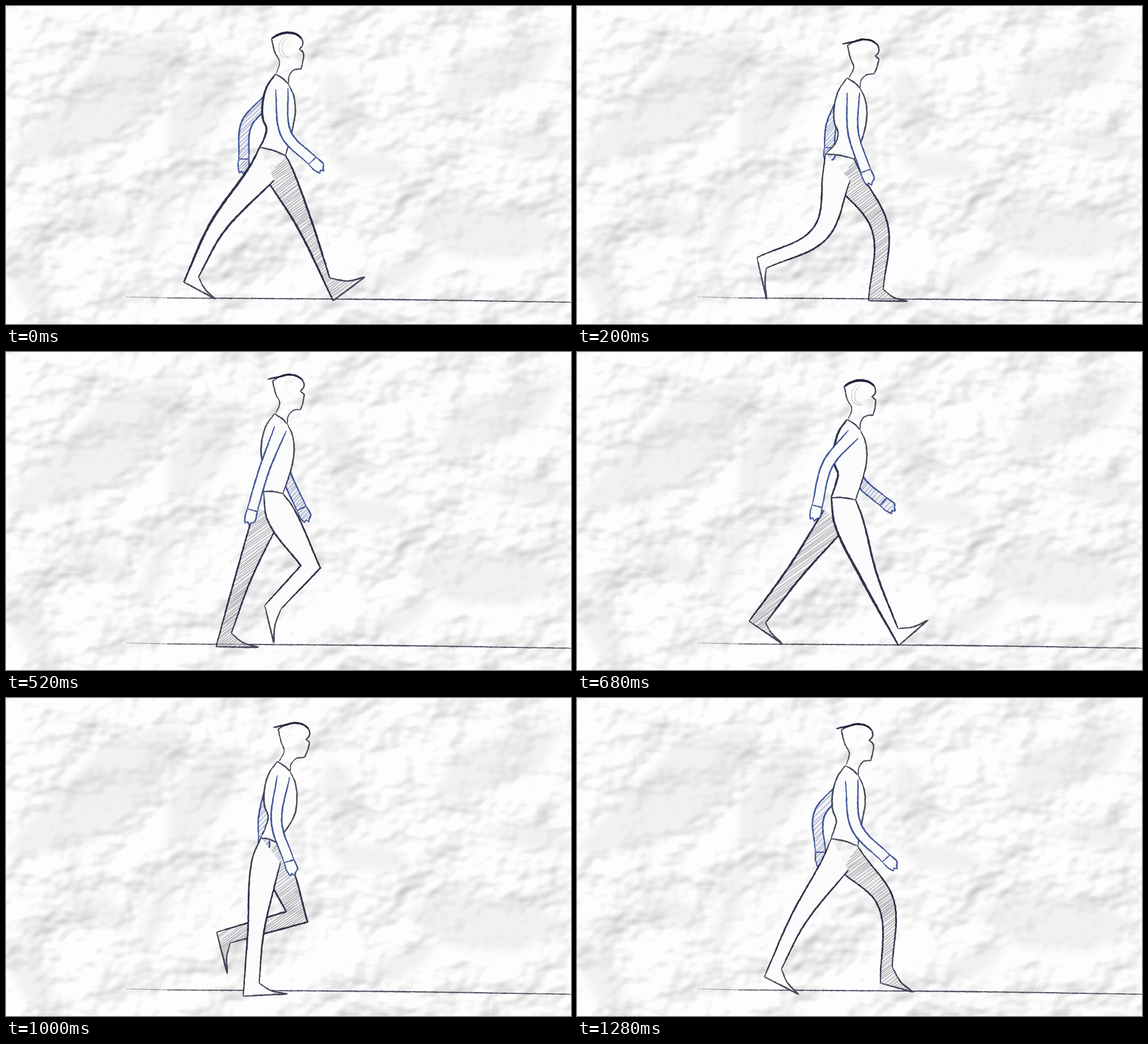
An HTML page for the animation above (1320 ms loop, 998x561 px).

```html
<!DOCTYPE html>
<html lang="en">
<head>
<meta charset="utf-8">
<title>Walk cycle</title>
<style>
html, body { margin: 0; width: 100%; height: 100%; overflow: hidden; background: #fafafa; }
svg { position: absolute; left: 0; top: 0; width: 100%; height: 100%; }
</style>
</head>
<body>
<svg id="paper" viewBox="0 0 998 561">
  <defs>
    <filter id="grain" x="0" y="0" width="100%" height="100%" color-interpolation-filters="sRGB">
      <feTurbulence type="fractalNoise" baseFrequency=".007 .009" numOctaves="4" seed="8"/>
      <feDiffuseLighting surfaceScale="13" diffuseConstant="1.135" lighting-color="#fff">
        <feDistantLight azimuth="225" elevation="60"/>
      </feDiffuseLighting>
    </filter>
    <filter id="soft" x="-20%" y="-20%" width="140%" height="140%"><feGaussianBlur stdDeviation="7"/></filter>
  </defs>
  <rect width="998" height="561" fill="#fafafa"/>
  <rect width="998" height="561" filter="url(#grain)" opacity=".6"/>
  <g id="folds" filter="url(#soft)" fill="#dcdcde" opacity=".36"></g>
  <g id="ground"></g>
</svg>
<svg id="figure" viewBox="0 0 998 561"></svg>

<script>
const PAPER = '#fbfbfb', INK = '#1c2138', PENCIL = '#35374c', BLUE = '#34478f';
const COUNT = 16, LOOP = 1320;
const hold = i => i === 0 || i === 12 ? 120 : i === 15 ? 40 : 80;
const starts = [0];
for (let i = 0; i < COUNT - 1; i++) starts.push(starts[i] + hold(i));

// Key poses by drawing. Body: neck, waist back, waist front, head lean.
const body = {
  0: [489, 128, 448, 249, 494, 264, 0, 0],
  2: [490, 135, 439, 261, 490, 270, 8, 5],
  6: [487, 117, 455, 246, 489, 250, 4, 4],
  8: [490, 127, 449, 257, 492, 261, 2, 4],
  10: [494, 130, 449, 264, 489, 265, 11, 5],
  12: [492, 120, 450, 247, 478, 255, 9, 5],
  15: [487, 127, 449, 248, 496, 261, 0, 0]
};
// Leg: knee, heel, instep, toe.
const nearLeg = {
  0: [372, 392, 314, 487, 340, 478, 370, 517],
  2: [430, 400, 318, 444, 334, 463, 335, 518],
  6: [538, 379, 457, 447, 486, 453, 473, 513],
  8: [517, 398, 568, 518, 567, 488, 620, 473],
  10: [533, 383, 511, 520, 538, 493, 584, 517],
  12: [441, 415, 419, 526, 447, 503, 497, 522],
  15: [390, 392, 331, 492, 361, 478, 392, 523]
};
const farLeg = {
  0: [526, 382, 578, 520, 572, 480, 634, 478],
  2: [535, 391, 515, 520, 541, 500, 584, 521],
  6: [419, 398, 371, 520, 398, 496, 446, 521],
  8: [385, 388, 304, 475, 333, 478, 363, 515],
  10: [436, 392, 306, 423, 342, 428, 316, 512],
  12: [514, 386, 372, 413, 396, 432, 391, 487],
  15: [545, 360, 536, 503, 557, 475, 594, 519]
};
// Arm: elbow, wrist.
const nearArm = {
  0: [495, 226, 541, 273], 2: [488, 224, 510, 291], 6: [457, 205, 435, 279], 8: [443, 198, 424, 272],
  10: [452, 207, 438, 275], 12: [478, 220, 500, 288], 15: [494, 228, 546, 283]
};
const farArm = {
  0: [425, 208, 420, 270], 2: [449, 212, 446, 250], 6: [498, 225, 522, 276], 8: [500, 228, 541, 264],
  10: [496, 232, 524, 288], 12: [455, 212, 455, 245], 15: [428, 205, 430, 272]
};
// The legs trade places half a cycle later.
for (const [to, from] of [[4, 12], [7, 15], [14, 6]]) {
  nearLeg[to] = farLeg[from];
  farLeg[to] = nearLeg[from];
}

const pairs = n => n.reduce((out, v, i) => (i % 2 ? out[out.length - 1].push(v) : out.push([v]), out), []);

// Outlines relative to the neck, and the hand relative to the wrist.
const HEAD = pairs([-11, -10, -6, -30, -14, -46, -20, -70, -9, -77, 8, -81, 24, -78, 33, -71,
  35, -59, 29, -52, 36, -46, 35, -29, 32, -17, 19, -15, 11, -4, 10, 9]);
const BACK = pairs([-13, -8, -28, 14, -36, 46, -35, 72, -29, 88, -33, 106]);
const CHEST = pairs([10, 10, 19, 30, 22, 58, 17, 88]);
const HAND = pairs([0, -9, 14, -9, 25, -6, 22, -2, 27, 2, 22, 5, 18, 10, 8, 10, 0, 9]);

let seed = 1;
const rnd = () => (seed = seed * 16807 % 2147483647) / 2147483647;
const add = (a, b, k = 1) => [a[0] + b[0] * k, a[1] + b[1] * k];
const sub = (a, b) => add(a, b, -1);
const lerp = (a, b, k) => a.map((v, i) => v + (b[i] - v) * k);
const unit = v => { const l = Math.hypot(...v) || 1; return [v[0] / l, v[1] / l]; };
const dot = (a, b) => a[0] * b[0] + a[1] * b[1];
const normal = d => [-d[1], d[0]];
const toPath = pts => 'M' + pts.map(p => p[0].toFixed(1) + ' ' + p[1].toFixed(1)).join('L');

function pose(track, at) {
  let lo = at, hi = at;
  while (!track[lo]) lo--;
  while (!track[hi % COUNT]) hi++;
  return pairs(lerp(track[lo], track[hi % COUNT], hi > lo ? (at - lo) / (hi - lo) : 0));
}

// Hermite curve through the points; sharp turns stay corners.
function curve(pts) {
  const last = pts.length - 1, out = [];
  const tangent = i => {
    if (i === 0 || i === last) return null;
    const a = unit(sub(pts[i], pts[i - 1])), b = unit(sub(pts[i + 1], pts[i]));
    return dot(a, b) < 0.6 ? null : unit(add(a, b));
  };
  for (let i = 0; i < last; i++) {
    const a = pts[i], b = pts[i + 1], side = sub(b, a), len = Math.hypot(...side);
    const m = tangent(i) || unit(side), n = tangent(i + 1) || unit(side);
    const steps = Math.max(2, Math.round(len / 3));
    for (let s = 0; s < steps; s++) {
      const t = s / steps;
      const p = add(add(a, side, t * t * (3 - 2 * t)), m, t * (1 - t) * (1 - t) * len);
      out.push(add(p, n, t * t * (t - 1) * len));
    }
  }
  return [...out, pts[last]];
}

// Brush stroke with tapered ends and slightly rough edges.
function stroke(pts, w, color, opacity = 0.9) {
  const line = curve(pts), left = [], right = [], end = line.length - 1;
  line.forEach((p, i) => {
    const n = normal(unit(sub(line[Math.min(end, i + 1)], line[Math.max(0, i - 1)])));
    const half = w * (0.48 + 0.42 * Math.sqrt(Math.abs(Math.sin(Math.PI * i / end)))) / 2;
    left.push(add(p, n, half + (rnd() - 0.5) * 0.7));
    right.unshift(add(p, n, -half + (rnd() - 0.5) * 0.7));
  });
  return `<path d="${toPath(left.concat(right))}Z" fill="${color}" opacity="${opacity}"/>`;
}

const ink = (pts, w) => stroke(pts, w, w >= 3.4 ? INK : PENCIL);
const fill = (pts, color, opacity = 1) => `<path d="${toPath(pts)}Z" fill="${color}" opacity="${opacity}"/>`;

function hatch(pts, degrees, gap, color) {
  const r = degrees * Math.PI / 180, c = Math.cos(r), s = Math.sin(r);
  const turned = pts.map(([x, y]) => [x * c + y * s, y * c - x * s]);
  const back = (x, y) => [x * c - y * s, x * s + y * c];
  const ys = turned.map(p => p[1]), bottom = Math.max(...ys);
  let d = '';
  for (let y = Math.min(...ys) + 1; y < bottom; y += gap * (0.6 + 0.8 * rnd())) {
    const xs = [];
    turned.forEach((a, i) => {
      const b = turned[(i + 1) % turned.length];
      if ((a[1] > y) !== (b[1] > y)) xs.push(a[0] + (b[0] - a[0]) * (y - a[1]) / (b[1] - a[1]));
    });
    xs.sort((a, b) => a - b);
    for (let i = 0; i + 1 < xs.length; i += 2)
      d += toPath([back(xs[i], y + rnd() * 2), back(xs[i + 1], y - rnd() * 2)]);
  }
  return `<path d="${d}" stroke="${color}" stroke-width="1.1" fill="none" opacity=".65"/>`;
}

// Offsets at the root and the middle joint of a two-bone limb.
function limb(root, joint, tip, wide, narrow) {
  const n = normal(unit(sub(joint, root))), m = normal(unit(sub(tip, joint)));
  const mid = unit(add(n, m)), k = narrow / Math.max(0.6, dot(mid, n));
  const side = sign => [add(root, n, sign * wide), add(joint, mid, sign * k)];
  return { back: side(1), front: side(-1), end: m };
}

function leg([knee, heel, instep, toe], [, waistB, waistF], near, contact) {
  const waist = lerp(waistB, waistF, 0.5), lead = knee[0] - waist[0];
  const hip = add(waist, [lead * 0.17, 35]);
  const l = limb(hip, knee, lerp(heel, instep, 0.5), 25, 14);
  const back = [...(near ? [waistB] : []), ...l.back, heel];
  const front = [...(lead > 20 ? [waistF] : []), ...l.front, instep];
  const sole = lerp(heel, toe, 0.5), top = lerp(lerp(instep, toe, 0.5), sole, 0.3);
  const foot = [heel, sole, toe, top, instep];
  const shape = [...curve(back), ...curve(foot), ...curve(front).reverse()];
  const paint = near ? fill(shape, PAPER)
    : fill(shape, '#e2e2e5', 0.45) + hatch(shape, -34, 4, '#73737c');
  const w = contact ? 4.1 : 3.4;
  return paint + ink(back, near && contact ? 5 : w) + ink(front, w) + ink(foot, 3.2);
}

function arm([elbow, wrist], neck, near) {
  const a = limb(add(neck, near ? [-2, 18] : [-22, 35]), elbow, wrist, 11, 9);
  const along = unit(sub(wrist, elbow));
  const hand = HAND.map(([x, y]) => add(add(wrist, along, x), a.end, -y));
  const back = [...a.back, hand[0]], front = [...a.front, hand[hand.length - 1]];
  const shape = [...curve(back), ...hand, ...curve(front).reverse()];
  const paint = near ? fill(shape, PAPER)
    : fill(shape, '#e4e6f0', 0.45) + hatch(shape, -42, 5, '#5868a4');
  return paint + stroke(back, 3.2, BLUE) + stroke(front, 3.2, BLUE) + stroke([...hand, hand[0]], 3, BLUE);
}

function drawing(at) {
  seed = 900 + at * 77;
  const contact = at % 8 === 0;
  const frame = pose(body, at), [neck, waistB, waistF, lean] = frame;
  const place = p => add(neck, p);
  const head = HEAD.map(p => add(place(p), lean, Math.min(1, Math.max(0, -p[1] / 50))));
  const back = [...BACK.map(place), waistB], chest = [...CHEST.map(place), waistF];
  const collar = [back[0], neck, chest[0]];
  const belt = [waistB, add(lerp(waistB, waistF, 0.5), [0, -2]), waistF];

  let out = arm(pose(farArm, at), neck, false);
  out += leg(pose(farLeg, at), frame, false, contact) + leg(pose(nearLeg, at), frame, true, contact);
  out += fill([...curve(back), ...curve(chest).reverse()], PAPER);
  out += ink(back, contact ? 4.4 : 3.2) + ink(chest, 3.1) + ink(collar, 3) + ink(belt, 3.2);
  if (contact) for (const dx of [13, 19]) {
    const p = add(head[3], [dx, 12]);
    out += stroke([add(p, [9, -16]), p, add(p, [3, 15]), add(p, [14, 22])], 1.3, '#aaaab0', 0.7);
  }
  const brow = add(head[3], contact || at === 10 ? [0, 0] : [-9, -3]);
  out += ink(head, 2.9) + ink([brow, ...head.slice(4, 8)], contact ? 5 : 4);
  return out + arm(pose(nearArm, at), neck, true);
}

// A fold is a ragged sliver: centre, length, slope in degrees.
function fold([x, y, length, slope]) {
  const r = slope * Math.PI / 180, along = [Math.cos(r), Math.sin(r)], across = normal(along);
  const at = (u, v) => add(add([x, y], along, u * length), across, v * length);
  const w = () => 0.06 + rnd() * 0.16;
  return toPath([at(-0.5, 0), at(-0.2, -w()), at(0.2, -w()), at(0.5, 0), at(0.2, w()), at(-0.2, w())]) + 'Z';
}

const $ = id => document.getElementById(id);
seed = 41;
const folds = [[150, 160, 390, -36], [345, 175, 210, -56], [870, 115, 270, -30], [645, 280, 170, 15],
  [850, 390, 300, 4], [270, 370, 190, -70], [45, 490, 150, 60], [920, 245, 170, 10],
  [160, 380, 140, 25], [592, 170, 130, 70], [700, 460, 140, -25]];
$('folds').innerHTML = folds.map(f => `<path d="${fold(f)}"/>`).join('');
$('ground').innerHTML = stroke([[212, 513], [290, 515], [400, 516]], 1.5, '#5b5a69', 0.55) +
  stroke([[285, 515], [450, 516], [690, 518], [1020, 523]], 2.5, '#37364c', 0.85);

const drawings = starts.map((_, i) => drawing(i));
let shown = -1;
function update() {
  const t = performance.now() % LOOP;
  const now = starts.filter(s => s <= t).length - 1;
  if (now !== shown) $('figure').innerHTML = drawings[shown = now];
  requestAnimationFrame(update);
}
update();
</script>
</body>
</html>
```
